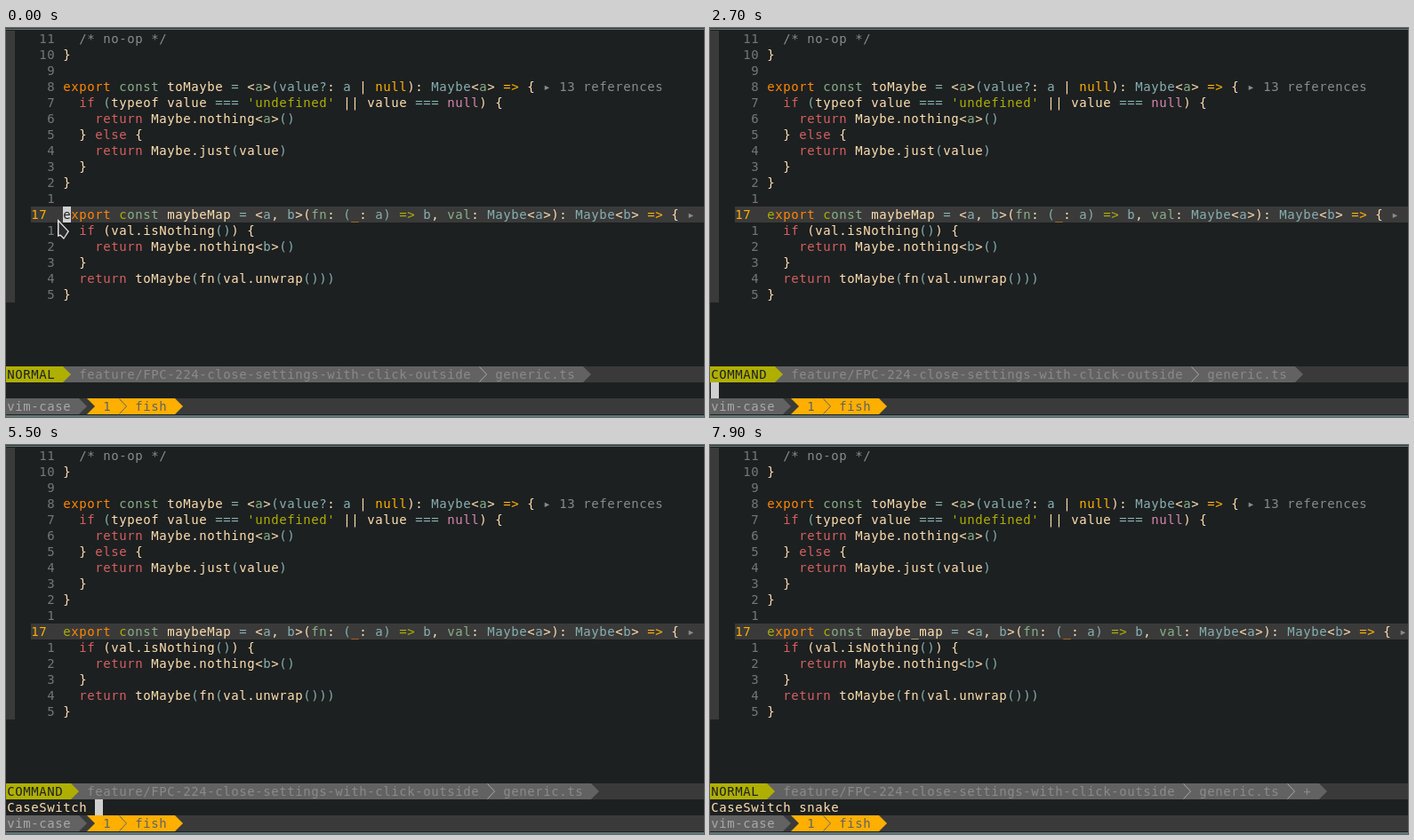
Animation, 785 px wide and 438 px high, one loop 8000 ms. Source, as an HTML page with a canvas:

```html
<!DOCTYPE html>
<html lang="en">
<head>
<meta charset="utf-8">
<title>Editor session</title>
<style>
html, body { margin: 0; width: 100%; height: 100%; overflow: hidden; background: #1d2021; }
canvas { display: block; width: 785px; height: 438px; }
</style>
</head>
<body>
<canvas id="stage" width="785" height="438"></canvas>
<script>
const ctx = document.getElementById('stage').getContext('2d');
const LOOP = 8000, CW = 9, RH = 18, W = 785, H = 438;
const BG = '#1d2021', BAND = '#3a3a3a', SEG = '#626262', DIM = '#8a8a8a';
const GREEN = '#afaf00', AMBER = '#ffaf00', BLOCK = '#d0d0d0', EDGE = '#5f7879';
const INK = {
  f: '#ffdfaf', r: '#d75f5f', g: GREEN, y: AMBER, o: '#ff8700',
  b: '#87afaf', a: '#87af87', p: '#d787af', d: DIM
};
const CUR = 11, STATUS = 21, CMD = 22, TMUX = 23, CODE = 7;

// "§x" switches the ink to colour x
const mapLine = name =>
  `§ge§oxport §gc§aonst §f${name} §b= §f<§ba§f, §bb§f>(§afn§f: §b(§o_§f: §ba§b) §g=> §bb§f, ` +
  '§aval§f: §bMaybe§f<§ba§f>): §bMaybe§f<§bb§f> §y=> §f{ §d▸';
const code = [
  '  §d/* no-op */',
  '§f}',
  '',
  '§oexport §aconst §ftoMaybe §b= §f<§aa§f>§b(value?§f: §ba §f| §ynull§f): §bMaybe§f<§aa§f> §y=> §f{ §d▸ 13 references',
  "  §rif §b(§ftypeof value §b=== §g'undefined' §f|| value §b=== §pnull§f) {",
  '    §rreturn §fMaybe.nothing<§aa§f>§b()',
  '  §f} §relse §f{',
  '    §rreturn §fMaybe.just§b(§fvalue§b)',
  '  §f}',
  '§f}',
  '',
  '',
  '  §rif §f(val.isNothing§b()§f) {',
  '    §rreturn §fMaybe.nothing<§bb§f>§b()',
  '  §f}',
  '  §rreturn §ftoMaybe§b(§ffn§b(§fval.unwrap§b()))',
  '§f}'
];

const command = 'CaseSwitch snake';
const keyTimes = [3000, 3200, 3400, 3600, 4100, 4300, 4400, 4500, 4800, 5000, 5200,
  5800, 6100, 6300, 6400, 6600];
const T = { word1: 600, word2: 1000, pointerOff: 2000, command: 2700, enter: 7200, done: 7300 };

const colX = c => 1 + c * CW;
const rowY = r => 3 + r * RH;

function rect(x, y, w, h, fill) {
  ctx.fillStyle = fill;
  ctx.fillRect(x, y, w, h);
}

function text(col, row, str, ink) {
  ctx.fillStyle = ink || INK.f;
  let switching = false;
  for (const ch of str) {
    if (switching) {
      ctx.fillStyle = INK[ch];
      switching = false;
    } else if (ch === '§') {
      switching = true;
    } else {
      if (ch !== ' ') ctx.fillText(ch, colX(col) + CW / 2, rowY(row) + 14);
      col++;
    }
  }
}

function poly(points, fill) {
  ctx.beginPath();
  points.forEach(([x, y]) => ctx.lineTo(x, y));
  ctx.closePath();
  ctx.fillStyle = fill;
  ctx.fill();
}

function arrow(col, row, fill) {
  const x = colX(col), y = rowY(row);
  poly([[x, y], [x + CW, y + RH / 2], [x, y + RH]], fill);
}

function chevron(col, row, ink) {
  const x = colX(col), y = rowY(row);
  ctx.beginPath();
  ctx.moveTo(x + 0.5, y + 0.5);
  ctx.lineTo(x + CW - 0.5, y + RH / 2);
  ctx.lineTo(x + 0.5, y + RH - 0.5);
  ctx.strokeStyle = ink;
  ctx.lineWidth = 1;
  ctx.stroke();
}

function block(col, row, ch) {
  rect(colX(col), rowY(row), CW, RH, BLOCK);
  if (ch) text(col, row, ch, BG);
}

function buffer(renamed) {
  rect(0, 3, 10, 17 * RH, BAND);
  rect(colX(3), rowY(CUR), W, RH, BAND);
  code.forEach((line, row) => {
    const here = row === CUR;
    const num = here ? '17 ' : String(Math.abs(CUR - row)).padStart(3);
    text(3, row, num, here ? AMBER : '#767676');
    text(CODE, row, here ? mapLine(renamed ? 'maybe_map' : 'maybeMap') : line);
  });
}

function statusLine(mode, modified) {
  const y = rowY(STATUS);
  const parts = ['feature/FPC-224-close-settings-with-click-outside', 'generic.ts'];
  if (modified) parts.push('+');
  const start = mode.length + 1;
  const end = parts.reduce((c, p) => c + p.length + 3, start + 1) - 1;
  rect(0, y, W, RH, BAND);
  rect(0, y, colX(end), RH, SEG);
  arrow(end, STATUS, SEG);
  rect(0, y, colX(start), RH, GREEN);
  arrow(start, STATUS, GREEN);
  text(0, STATUS, mode, BG);
  let col = start + 2;
  parts.forEach((p, i) => {
    if (i) chevron(col - 2, STATUS, '#a8a8a8');
    text(col, STATUS, p, DIM);
    col += p.length + 3;
  });
}

function tmuxLine() {
  const y = rowY(TMUX);
  rect(0, y, W, RH, BAND);
  rect(0, y, colX(9), RH, SEG);
  arrow(9, TMUX, SEG);
  rect(colX(10), y, 11 * CW, RH, AMBER);
  arrow(10, TMUX, BAND);
  arrow(21, TMUX, AMBER);
  text(0, TMUX, 'vim-case', '#a8a8a8');
  text(12, TMUX, '1', SEG);
  chevron(14, TMUX, SEG);
  text(16, TMUX, 'fish', SEG);
}

function pointer() {
  poly([[58, 215], [58, 235], [61, 234], [65, 238], [71, 229]], '#e4e4e4');
  poly([[59.5, 218.5], [59.5, 233], [61.5, 232.5], [65, 236], [69.3, 229]], '#2b2b2b');
}

function draw(t) {
  const typing = t >= T.command && t < T.done;
  const renamed = t >= T.done;
  rect(0, 0, W, H, BG);
  rect(0, 0, W, 1, BAND);
  rect(0, 1, W, 1, EDGE);
  rect(0, 436, W, 2, EDGE);
  ctx.font = '14px "DejaVu Sans Mono", monospace';
  ctx.textAlign = 'center';
  ctx.textBaseline = 'alphabetic';

  buffer(renamed);
  statusLine(typing ? 'COMMAND' : 'NORMAL', renamed);
  tmuxLine();

  const typed = keyTimes.filter(k => t >= k).length;
  text(0, CMD, command.slice(0, typed));
  if (typing && t < T.enter) block(typed, CMD);
  if (t < T.command) {
    const at = t < T.word1 ? 0 : t < T.word2 ? 7 : 13;
    block(CODE + at, CUR, 'export const maybeMap'[at]);
  }
  if (t < T.pointerOff) pointer();
}

const begun = performance.now();
function tick() {
  draw((performance.now() - begun) % LOOP);
  requestAnimationFrame(tick);
}
tick();
</script>
</body>
</html>
```
